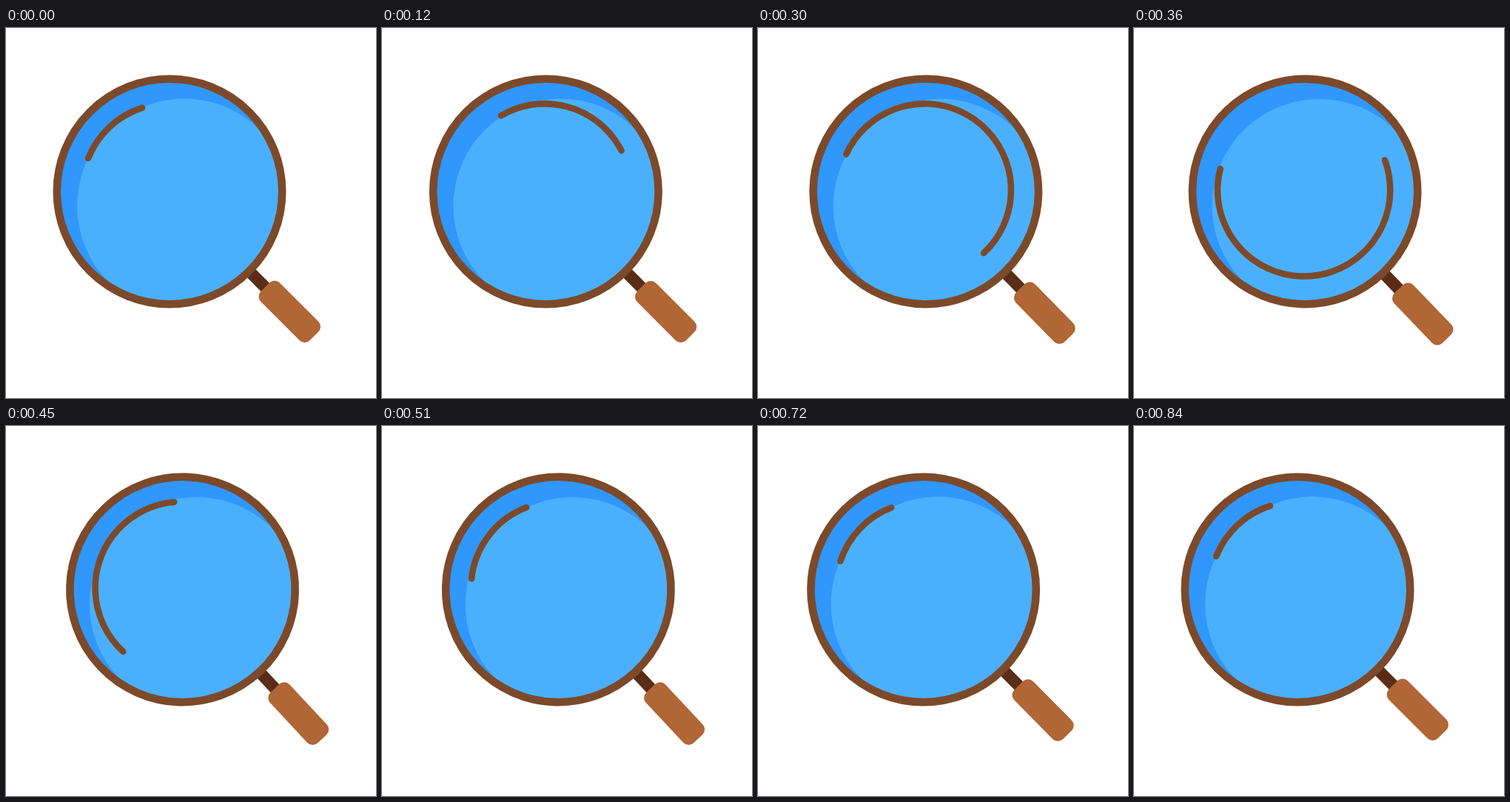
These frames come from a looping animation (500 by 500 pixels, 0.9 s). An HTML page with a canvas:

```html
<!DOCTYPE html>
<html lang="en">
<head>
<meta charset="utf-8">
<title>Magnifying glass</title>
<style>
  html, body { margin: 0; width: 100%; height: 100%; overflow: hidden; background: #fff; }
  canvas { display: block; width: 500px; height: 500px; }
</style>
</head>
<body>
<canvas id="stage" width="500" height="500"></canvas>
<script>
const ctx = document.getElementById('stage').getContext('2d');
const LOOP = 900, STEP = 30, LAST = 840;
const RAD = Math.PI / 180;
const COLORS = {
  rim: '#7c4a2a', neck: '#5a2d18', grip: '#b06635',
  glass: '#4ab0fe', shade: '#3097fd'
};

// Sway of the whole glass (0..1) and turn of the glint in degrees, as [ms, value].
const SWAY = [[0, 0], [120, .02], [240, .145], [360, .56], [450, .975], [480, 1],
              [540, .88], [600, .645], [720, .145], [810, 0], [840, 0]];
const TURN = [[0, 0], [120, 38], [240, 228], [360, 497], [450, 649],
              [540, 717], [600, 723], [720, 716.3], [840, 720]];

function tangent(keys, i) {
  if (i === 0 || i === keys.length - 1) return 0;
  const [[t0, v0], [t1, v1], [t2, v2]] = keys.slice(i - 1, i + 2);
  const before = (v1 - v0) / (t1 - t0), after = (v2 - v1) / (t2 - t1);
  if (before * after <= 0) return 0;
  return (before * (t2 - t1) + after * (t1 - t0)) / (t2 - t0);
}

// Cubic Hermite curve, flat at the turning points.
function follow(keys, t) {
  let i = 0;
  while (i < keys.length - 2 && t > keys[i + 1][0]) i++;
  const [t0, v0] = keys[i], [t1, v1] = keys[i + 1];
  const h = t1 - t0, u = (t - t0) / h, w = 1 - u;
  return v0 * w * w * (1 + 2 * u) + v1 * u * u * (3 - 2 * u) +
    h * u * w * (tangent(keys, i) * w - tangent(keys, i + 1) * u);
}

function smooth(t, from, to) {
  const u = Math.min(1, Math.max(0, (t - from) / (to - from)));
  return u * u * (3 - 2 * u);
}

function disc(x, y, radius, color) {
  ctx.fillStyle = color;
  ctx.beginPath();
  ctx.arc(x, y, radius, 0, 2 * Math.PI);
  ctx.fill();
}

function ringArc(x, y, radius, from, to, width) {
  ctx.strokeStyle = COLORS.rim;
  ctx.lineWidth = width;
  ctx.lineCap = 'round';
  ctx.beginPath();
  ctx.arc(x, y, radius, from * RAD, to * RAD);
  ctx.stroke();
}

function drawHandle() {
  ctx.save();
  ctx.rotate(45 * RAD);
  ctx.fillStyle = COLORS.neck;
  ctx.fillRect(148, -8, 45, 16);
  ctx.fillStyle = COLORS.grip;
  ctx.beginPath();
  ctx.roundRect(182.7, -18, 93.6, 36, 10);
  ctx.fill();
  ctx.restore();
}

function drawLens() {
  disc(0, 0, 150, COLORS.shade);
  ctx.save();
  ctx.beginPath();
  ctx.arc(0, 0, 150, 0, 2 * Math.PI);
  ctx.clip();
  disc(20, 19.5, 145, COLORS.glass);
  ctx.restore();
  ringArc(0, 0, 152.2, 0, 360, 10.6);
}

function drawGlint(t) {
  const tail = 201.6 + follow(TURN, t);
  const length = 50.7 + 163.8 * (smooth(t, 0, 360) - smooth(t, 360, 540));
  ringArc(-1.5, -2, 116.6, tail, tail + length, 8.6);
}

function draw(t) {
  const sway = follow(SWAY, t);
  ctx.fillStyle = '#fff';
  ctx.fillRect(0, 0, 500, 500);
  ctx.save();
  ctx.translate(221 + 18 * sway, 221);
  ctx.rotate(2 * sway * RAD);
  drawHandle();
  drawLens();
  drawGlint(t);
  ctx.restore();
}

const start = performance.now();
function tick() {
  const elapsed = (performance.now() - start) % LOOP;
  draw(Math.min(LAST, Math.floor(elapsed / STEP) * STEP));
  requestAnimationFrame(tick);
}
tick();
</script>
</body>
</html>
```
